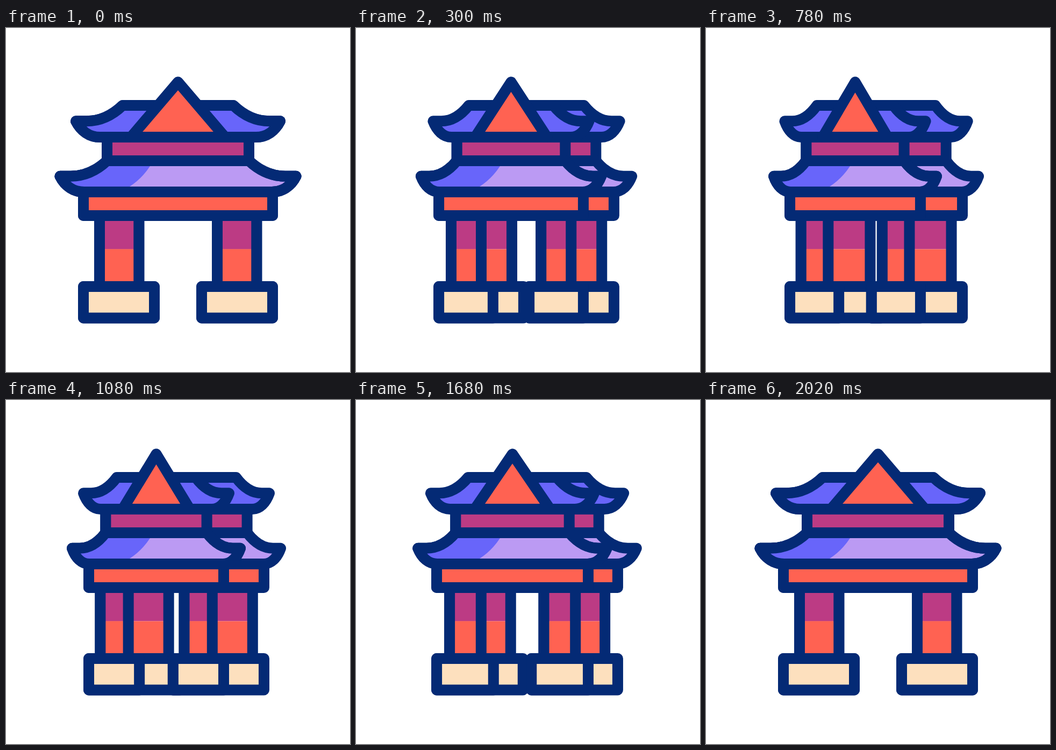
These frames come from a looping animation (640 by 640 pixels, 2.4 s). An HTML page:

```html
<!DOCTYPE html>
<html>
<head>
<meta charset="utf-8">
<style>
  html, body { margin: 0; width: 100%; height: 100%; overflow: hidden; background: #fff; }
  svg { display: block; width: 100vw; height: 100vh; }
</style>
</head>
<body>
<svg viewBox="0 0 640 640">
  <defs><clipPath id="eaves"><path id="eavesShape"/></clipPath></defs>
  <g id="gate" stroke="#042a75" stroke-width="20" stroke-linejoin="round" stroke-linecap="round"></g>
</svg>
<script>
const RED = '#ff6252', PLUM = '#bc3b84', CREAM = '#fde0be', BLUE = '#6865fa', LILAC = '#bb9af3';
const LOOP = 2400, STEP = 20;

// time, width scale, centre of the front face, centre of the back face
const KEYS = [
  [0, 1, 320, 320],
  [400, .685, 278, 354],
  [780, .69, 277.5, 355.6],
  [1080, .713, 279.5, 354.5],
  [1360, .739, 282, 353],
  [1600, .754, 284.2, 352.1],
  [2020, 1, 320, 320]
];

const gate = document.getElementById('gate');
const eavesShape = document.getElementById('eavesShape');
const updaters = [];

function add(fill, shape, attrs = {}) {
  const path = document.createElementNS('http://www.w3.org/2000/svg', 'path');
  path.setAttribute('fill', fill);
  for (const name in attrs) path.setAttribute(name, attrs[name]);
  gate.append(path);
  updaters.push((front, back) => path.setAttribute('d', shape(front, back)));
}

const box = (x0, y0, x1, y1) => `M${x0} ${y0}H${x1}V${y1}H${x0}Z`;

// Half widths are measured from the centre of a face.
function roof(at, top, tip, y, tipY, bottomY) {
  const side = k => {
    const p = (x, py) => `${at(k * x)} ${py}`;
    return [
      p(top, y), p(top - 0 + (tip - top) * .21, y + (tipY - y) * .6),
      p(tip - 46, tipY), p(tip - 20, tipY), p(tip, tipY),
      p(tip - 9, tipY + 18), p(tip - 25, bottomY), p(tip - 45, bottomY)
    ];
  };
  const l = side(-1), r = side(1);
  return `M${l[0]}C${l[1]} ${l[2]} ${l[3]}L${l[4]}C${l[5]} ${l[6]} ${l[7]}` +
    `L${r[7]}C${r[6]} ${r[5]} ${r[4]}L${r[3]}C${r[2]} ${r[1]} ${r[0]}Z`;
}
const upperRoof = at => roof(at, 103, 190, 144, 173.3, 203);
const lowerRoof = at => roof(at, 132, 219.5, 247, 275.8, 305);

// A wall shows its side up to the back face, then its front over that.
function wall(fill, x0, y0, x1, y1, lowerFill, splitY) {
  const ends = [(f, b) => b(x1), f => f(x1)];
  for (const end of ends) {
    const area = (top, bottom) => (f, b) => box(f(x0), top, end(f, b), bottom);
    if (lowerFill) {
      add(fill, area(y0, splitY), { stroke: 'none' });
      add(lowerFill, area(splitY, y1), { stroke: 'none' });
      add('none', area(y0, y1));
    } else add(fill, area(y0, y1));
  }
}

for (const x of [-146, 73]) wall(PLUM, x, 349, x + 73.3, 481, RED, 411.5);
wall(CREAM, -176, 481, -44, 539.5);
wall(CREAM, 44, 481, 176, 539.5);
wall(RED, -176, 305, 176, 349);
wall(PLUM, -132, 203, 132, 247);

add(LILAC, (f, b) => lowerRoof(b));
add(LILAC, f => lowerRoof(f));
add(BLUE, () => 'M0 240H277L268 257Q253 280 230 295L218 305H0Z',
  { stroke: 'none', 'clip-path': 'url(#eaves)' });
add('none', f => lowerRoof(f));

add(BLUE, (f, b) => upperRoof(b));
add(BLUE, f => upperRoof(f));
add(RED, f => `M${f(-87.5)} 203L${f(0)} 100.5L${f(87.5)} 203Z`);

function pose(t) {
  const i = KEYS.findIndex(k => k[0] > t);
  if (i < 0) return KEYS[KEYS.length - 1];
  const a = KEYS[i - 1], b = KEYS[i], u = (t - a[0]) / (b[0] - a[0]);
  return a.map((v, j) => v + (b[j] - v) * u);
}

function render(ms) {
  const [, scale, frontX, backX] = pose(Math.floor(ms % LOOP / STEP) * STEP);
  const front = x => +(frontX + x * scale).toFixed(2);
  const back = x => +(backX + x * scale).toFixed(2);
  for (const update of updaters) update(front, back);
  eavesShape.setAttribute('d', lowerRoof(front));
}

const start = performance.now();
function tick() {
  render(performance.now() - start);
  requestAnimationFrame(tick);
}
tick();
</script>
</body>
</html>
```
